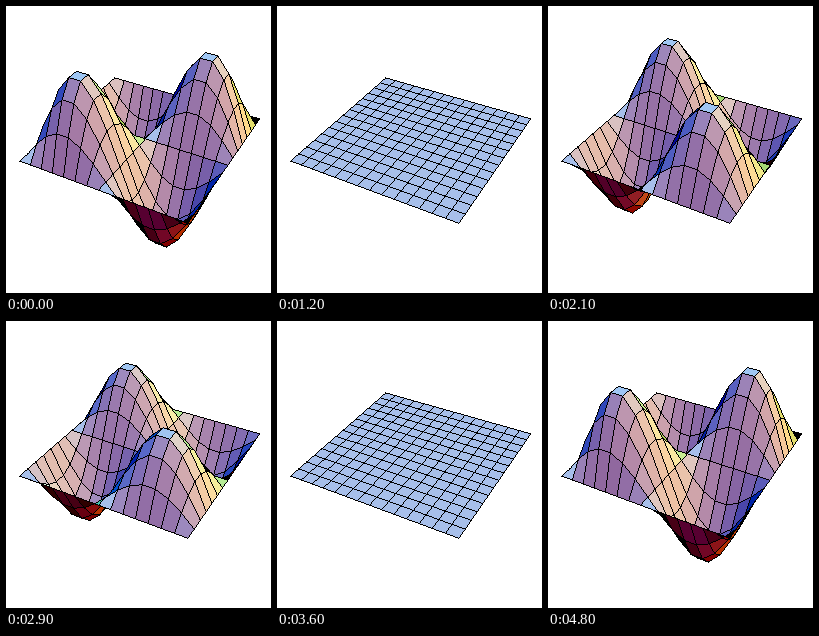
Animation, 265 px wide and 287 px high, one loop 4.9 s. Source, as a matplotlib script:

```python
import numpy as np
import matplotlib.pyplot as plt
from matplotlib.animation import FuncAnimation
from matplotlib.path import Path

W, H, DPI = 265, 287, 64
CELLS = 14
FRAMES, PERIOD = 49, 48
HEIGHT = 0.492                      # peak height of the membrane
SCALE, CX, CY = 598, 139.5, 132.9   # projection scale and centre in pixels

# Perspective camera looking at the middle of the unit box
EYE = np.array([1.3, -2.4, 2.0])
DIST = np.linalg.norm(EYE)
BACK = EYE / DIST
RIGHT = np.cross([0, 0, 1], BACK)
RIGHT /= np.linalg.norm(RIGHT)
VIEW = np.array([RIGHT, np.cross(BACK, RIGHT), BACK])

# Directions of the red, green and blue lamps, as seen on screen
LAMPS = np.array([[1, 0, 1], [1, 1, 1], [0, 1, 1]], float)
LAMPS /= np.linalg.norm(LAMPS, axis=1, keepdims=True)

axis = np.linspace(-0.5, 0.5, CELLS + 1)
# Rows run from the far side to the near side, so quads paint back to front
X, Y = np.meshgrid(axis, axis[::-1])
MODE = HEIGHT * np.sin(2 * np.pi * X) * np.sin(2 * np.pi * Y)


def quads(grid):
    """Corner points of every cell, in painting order."""
    corners = grid[1:, :-1], grid[1:, 1:], grid[:-1, 1:], grid[:-1, :-1]
    return np.stack(corners, axis=2).reshape(-1, 4, 3)


def project(points):
    """Perspective position (x, y, inverse depth) of each point."""
    view = points @ VIEW.T
    depth = DIST - view[..., 2:]
    view[..., 2] = 1
    return view / depth


def shade(cells):
    """Lambert shading from the first corner of each projected cell."""
    normal = np.cross(cells[:, 1] - cells[:, 0], cells[:, 3] - cells[:, 0])
    normal /= np.linalg.norm(normal, axis=1, keepdims=True)
    normal *= np.where(normal[:, 2:] < 0, -1, 1)
    return np.clip(normal @ LAMPS.T, 0, 1)


def fill(img, quad, color):
    x0, y0 = np.floor(quad.min(axis=0)).astype(int)
    x1, y1 = np.ceil(quad.max(axis=0)).astype(int)
    px, py = np.meshgrid(np.arange(x0, x1), np.arange(y0, y1))
    px, py = px.ravel(), py.ravel()
    inside = Path(quad).contains_points(np.column_stack([px, py]) + 0.5)
    img[py[inside], px[inside]] = color


def line(img, a, b):
    """Hard line, one pixel wide."""
    major = np.argmax(np.abs(b - a))
    if a[major] > b[major]:
        a, b = b, a
    minor = 1 - major
    steps = np.arange(int(a[major]), int(b[major]) + 1)
    across = np.interp(steps + 0.5, [a[major], b[major]],
                       [a[minor], b[minor]]).astype(int)
    px, py = (steps, across) if major == 0 else (across, steps)
    img[py, px] = 0


def render(i):
    z = MODE * np.cos(2 * np.pi * i / PERIOD)
    cells = quads(project(np.stack([X, Y, z], axis=-1)))
    screen = cells[..., :2] * [SCALE, -SCALE] + [CX, CY]
    img = np.ones((H, W, 3))
    for quad, color in zip(screen, shade(cells)):
        fill(img, quad, color)
        for a, b in zip(quad, np.roll(quad, -1, axis=0)):
            line(img, a, b)
    return img


fig = plt.figure(figsize=(W / DPI, H / DPI), dpi=DPI, facecolor="white")
ax = fig.add_axes([0, 0, 1, 1])
ax.axis("off")
picture = ax.imshow(np.ones((H, W, 3)), aspect="auto", interpolation="nearest")


def update(i):
    picture.set_data(render(i))
    return [picture]


anim = FuncAnimation(fig, update, frames=FRAMES, interval=100,
                     repeat=True, repeat_delay=0)
plt.show()
```
